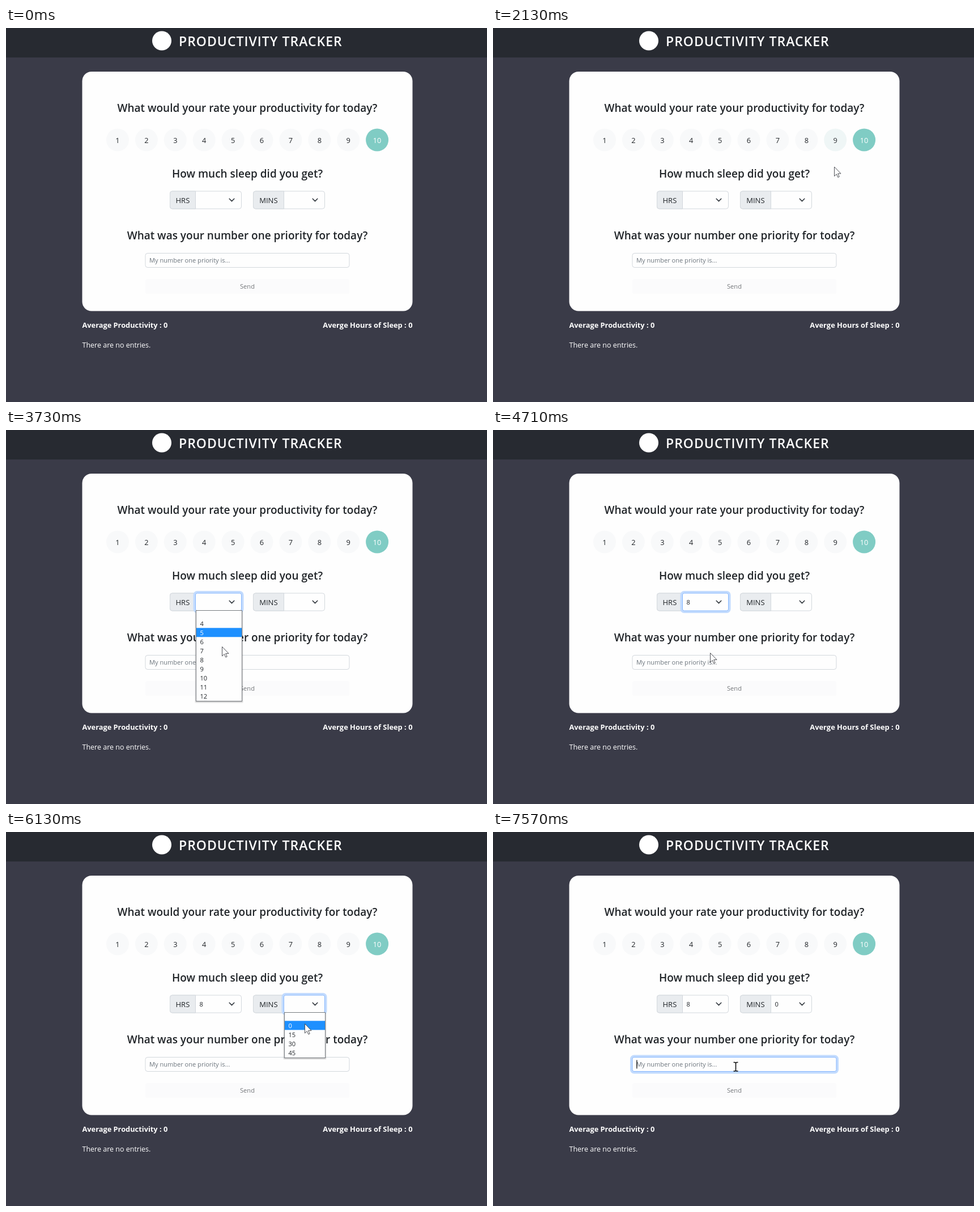
Write an HTML page that moves like this. It is 849 px wide and 660 px high and loops after 7990 ms.

```html
<!DOCTYPE html>
<html lang="en">
<head>
<meta charset="utf-8">
<title>Productivity Tracker</title>
<style>
  html, body { margin: 0; width: 100%; height: 100%; overflow: hidden; background: #3a3b48; }
  svg { display: block; width: 100vw; height: 100vh; }
  text { font-family: "Open Sans", "Noto Sans", sans-serif; fill: #212529; white-space: pre; }
</style>
</head>
<body>
<svg id="stage" viewBox="0 0 849 660"></svg>
<script>
const LOOP = 7990, STEP = 143;
const TEAL = [128, 204, 196], PALE = [248, 249, 250], INK = [33, 37, 41], WHITE = [255, 255, 255];
const stage = document.getElementById('stage');

function add(tag, attrs, parent = stage) {
  const el = document.createElementNS('http://www.w3.org/2000/svg', tag);
  for (const key in attrs) el.setAttribute(key, attrs[key]);
  parent.appendChild(el);
  return el;
}
const group = () => add('g', {});
const rect = (x, y, width, height, fill, more, parent) =>
  add('rect', { x, y, width, height, fill, ...more }, parent);

function label(str, x, y, size, more, parent) {
  const el = add('text', { x, y, 'font-size': size, ...more }, parent);
  el.textContent = str;
  return el;
}
const show = (el, on) => { el.style.display = on ? '' : 'none'; };
const MID = { 'text-anchor': 'middle' };
const BORDER = { rx: 4, stroke: '#d3d8dd' };
const heading = (str, y) => label(str, 426, y, 19, { ...MID, 'font-weight': 600 });

// Header and card
rect(0, 0, 849, 52, '#272a31');
add('circle', { cx: 275, cy: 22.5, r: 17, fill: '#fff' });
label('PRODUCTIVITY TRACKER', 305, 32, 23, { 'font-weight': 600, 'letter-spacing': 1, style: 'fill:#fff' });
rect(134.5, 77, 583, 422.5, '#fefefe', { rx: 16.5 });
heading('What would your rate your productivity for today?', 148);
heading('How much sleep did you get?', 263.5);
heading('What was your number one priority for today?', 373);

// Rating buttons
const ratingX = i => 197 + i * 50.9;
const ratings = Array.from({ length: 10 }, (_, i) => ({
  disc: add('circle', { cx: ratingX(i), cy: 197.5, r: 20, fill: '#f8f9fa' }),
  num: label(i + 1, ratingX(i), 203, 12.8, MID)
}));

function focusRing(x, y, w, h) {
  const g = group();
  rect(x - 1.5, y - 1.5, w + 3, h + 3, 'none', { rx: 5, stroke: '#c2dbfe', 'stroke-width': 4 }, g);
  rect(x + .5, y + .5, w - 1, h - 1, '#fefefe', { rx: 3, stroke: '#86b7fe' }, g);
  return g;
}

// Select with a grey caption, its focus ring and its value
function picker(x, split, right, caption, value) {
  rect(x + .5, 288, right - x - 1, 31, '#fefefe', BORDER);
  add('path', {
    d: `M${split + .5} 288H${x + 4.5}q-4 0-4 4v23q0 4 4 4H${split + .5}z`,
    fill: '#e9ecef', stroke: '#d3d8dd'
  });
  label(caption, (x + split) / 2 + .4, 308.5, 13, MID);
  const ring = focusRing(split, 287.5, right - split, 32);
  add('path', {
    d: `M${right - 21.8} 301.3l4.3 4.3 4.3-4.3`, fill: 'none', stroke: '#343a40',
    'stroke-width': 1.6, 'stroke-linecap': 'round', 'stroke-linejoin': 'round'
  });
  return { ring, value: label(value, split + 7.5, 307.5, 11.2) };
}
const hours = picker(289, 334, 416, 'HRS', '8');
const mins = picker(436, 490, 563, 'MINS', '0');

// Text field and button
rect(246, 397.5, 360, 25, '#fefefe', BORDER);
const fieldRing = focusRing(245.5, 397, 361, 26);
label('My number one priority is...', 253, 414.2, 11.05, { style: 'fill:#6c757d' });
const caret = rect(253.3, 402.5, 1.2, 15, '#000');
rect(246, 443, 360, 26, '#fbfbfc', { rx: 3.5 });
label('Send', 426, 460.3, 11.1, { ...MID, style: 'fill:#74777a' });

// Totals
const bold = { 'font-weight': 700, style: 'fill:#fff' };
label('Average Productivity : 0', 134.5, 529, 12.8, bold);
label('Averge Hours of Sleep : 0', 717.5, 529, 12.9, { ...bold, 'text-anchor': 'end' });
label('There are no entries.', 134.5, 564, 12.5, { style: 'fill:#fff' });

// Option list; the first row is blank
function optionList(x, width, options) {
  const g = group(), height = options.length * 16;
  for (let i = 3; i > 0; i--)
    rect(x - i + 1, 319, width + 2 * i - 2, height + i, '#000', { opacity: .07, rx: i }, g);
  rect(x + .5, 318.5, width - 1, height, '#fefefe', { stroke: '#777b80' }, g);
  const bar = rect(x + 1, 0, width - 2, 16, '#1e90ff', {}, g);
  const rows = options.map((str, i) => label(str, x + 7.5, 330 + i * 16, 11.1, {}, g));
  return (open, y) => {
    show(g, open);
    const row = Math.max(0, Math.floor((y - 333) / 16) + 1);
    bar.setAttribute('y', row ? 317.3 + row * 16 : 319);
    bar.setAttribute('height', row ? 16 : 14.3);
    rows.forEach((r, i) => { r.style.fill = i === row ? '#fff' : '#212529'; });
  };
}
const hourList = optionList(335, 82, ['', ...Array.from({ length: 9 }, (_, i) => i + 4)]);
const minList = optionList(491, 73, ['', 0, 15, 30, 45]);

// Pointers, each with its hot spot at 0,0
const pointer = group();
const outline = { fill: '#fff', stroke: '#3c3e44', 'stroke-width': .9, 'stroke-linejoin': 'round' };
const shapes = {
  arrow: add('path', { ...outline, d: 'M.5.5V17L4.3 13.4 6.8 19 9.2 18 6.7 12.4H12z' }, pointer),
  hand: add('path', {
    ...outline,
    d: 'M-2 1.5Q-2 0 0 0T2 1.5V8Q5 6.8 5.5 9 8 8 8.5 10 10.5 9.3 10.5 12V16Q10.5 19 8.5 21V23.5H-1V21' +
       'Q-3 18.5-6 14-6.5 12-4.5 12L-2 14.5zM2 8v4M5.5 9v3.5M8.5 10v3M-2 14.5v1'
  }, pointer),
  beam: add('path', {
    d: 'M-4-7.5H-1.5L0-6.5 1.5-7.5H4M0-6.5V7M-4 8H-1.5L0 7 1.5 8H4',
    fill: 'none', stroke: '#111', 'stroke-width': 1.6
  }, pointer)
};

// When things happen
const ENTER = 270, PICK_NINE = 850, PICK_TEN = 1990, OPEN_HOURS = 3140, CLOSE_HOURS = 4300,
      OPEN_MINS = 5420, CLOSE_MINS = 6430, FOCUS_FIELD = 7430;

// The picture steps within these spans and holds still between them
const bursts = [[ENTER, 1280], [1410, 1560], [PICK_TEN, 2990], [OPEN_HOURS, 4150],
                [CLOSE_HOURS, 5290], [OPEN_MINS, 6130], [CLOSE_MINS, 6990], [FOCUS_FIELD, 7570]];

// Places the pointer glides between
const stops = [
  { t: ENTER, x: 579, y: 297 },
  { t: PICK_NINE, x: 604, y: 195 },
  { t: 1130, x: 604, y: 195 },
  { t: 1280, x: 642, y: 203 },
  { t: 1560, x: 655, y: 213 },
  { t: 1900, x: 655, y: 213 },
  { t: 2600, x: 450, y: 335 },
  { t: 2990, x: 406, y: 308 },
  { t: 3290, x: 406, y: 308 },
  { t: 3720, x: 381, y: 382 },
  { t: 4150, x: 383, y: 402 },
  { t: 4725, x: 383, y: 393 },
  { t: 5290, x: 541, y: 303 },
  { t: 5570, x: 541, y: 303 },
  { t: 6060, x: 527, y: 338 },
  { t: CLOSE_MINS, x: 527, y: 338 },
  { t: 6990, x: 428.5, y: 414 }
];

function stepTime(t) {
  const burst = bursts.filter(b => b[0] <= t).pop();
  if (!burst) return 0;
  const [start, end] = burst;
  const gap = (end - start) / Math.round((end - start) / STEP);
  return Math.min(end, start + gap * Math.floor((t - start + 15) / gap));
}

const ramp = (t, start, span) => {
  const p = Math.min(1, Math.max(0, (t - start) / span));
  return p * p * (3 - 2 * p);
};
const pulse = (t, on, off) => ramp(t, on - 70, 150) - ramp(t, off - 70, 150);
const mix = (a, b, p) => `rgb(${a.map((v, i) => Math.round(v + (b[i] - v) * p))})`;

function pointerAt(t) {
  const i = Math.max(0, stops.findLastIndex(s => s.t <= t));
  const a = stops[i], b = stops[i + 1] || a;
  const p = ramp(t, a.t, b.t - a.t || 1);
  return { x: a.x + (b.x - a.x) * p, y: a.y + (b.y - a.y) * p };
}

function tint({ disc, num }, p) {
  disc.setAttribute('fill', mix(PALE, TEAL, p));
  num.style.fill = mix(INK, WHITE, p);
}

function pointerKind({ x, y }, t) {
  if (t > CLOSE_MINS && y > 397) return 'beam';
  const overRating = [8, 9].some(i => Math.hypot(x - ratingX(i), y - 197.5) < 20);
  return overRating ? 'hand' : 'arrow';
}

function render(t) {
  const time = stepTime(t), at = pointerAt(time);
  tint(ratings[8], ramp(time, PICK_NINE - 160, 280) - ramp(time, PICK_TEN - 90, 280));
  tint(ratings[9], 1 - ramp(time, PICK_NINE, 300) + ramp(time, 1230, 300));

  hours.ring.setAttribute('opacity', pulse(time, OPEN_HOURS, OPEN_MINS));
  mins.ring.setAttribute('opacity', pulse(time, OPEN_MINS, FOCUS_FIELD));
  fieldRing.setAttribute('opacity', pulse(time, FOCUS_FIELD, LOOP + 100));
  show(hours.value, t >= CLOSE_HOURS);
  show(mins.value, t >= CLOSE_MINS);
  show(caret, t >= FOCUS_FIELD);

  // The highlighted row trails the pointer by one step
  const trail = pointerAt(time - STEP).y;
  hourList(t >= OPEN_HOURS && t < CLOSE_HOURS, trail);
  minList(t >= OPEN_MINS && t < CLOSE_MINS, trail);

  show(pointer, t >= ENTER);
  pointer.setAttribute('transform', `translate(${at.x} ${at.y})`);
  const kind = pointerKind(at, t);
  for (const name in shapes) show(shapes[name], name === kind);
}

const begin = performance.now();
function frame() {
  render((performance.now() - begin) % LOOP);
  requestAnimationFrame(frame);
}
frame();
</script>
</body>
</html>
```
